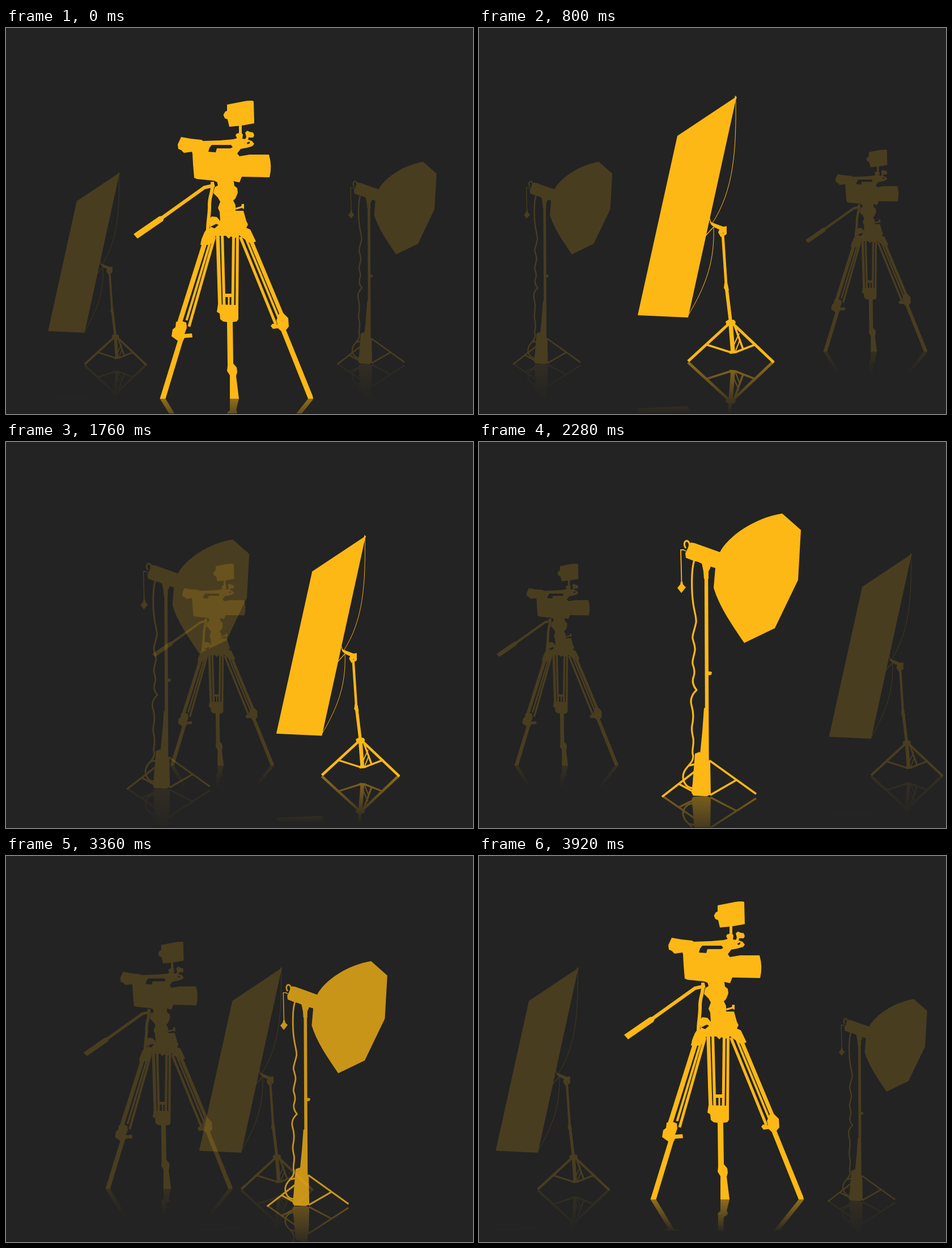
These frames come from a looping animation (824x680 px, 4.04 s). An HTML page with a canvas:

```html
<!DOCTYPE html>
<html lang="en">
<head>
<meta charset="utf-8">
<title>Studio gear</title>
<style>
html, body { margin: 0; width: 100%; height: 100%; overflow: hidden; background: #232323; }
canvas { display: block; }
</style>
</head>
<body>
<canvas id="stage" width="824" height="680"></canvas>
<script>
const W = 824, H = 680, LOOP = 4040, STEP = 40;
const YELLOW = '#fdb815', DIM = 0.173;

const ctx = document.getElementById('stage').getContext('2d');
const layer = document.createElement('canvas');
layer.width = W;
layer.height = H;
const ink = layer.getContext('2d');

// Slides between poses: [start, end]
const moves = [[0, 560], [1480, 1960], [3040, 3720]];

// pose: [x, y, scale] of the lower left corner; fade: [start, end, from, to]
const panel = {
  origin: [280, 589], floor: 588, squash: 1, mirror: [92, 92, 0.5, 0],
  poses: [[74.2, 594, 0.724], [280, 589, 1], [617.6, 588.7, 0.836], [29.5, 588.7, 0.836]],
  fades: [[320, 560, DIM, 1], [1800, 2040, 1, DIM]],
  fills: [
    'M452 119L455 122L453 127L369 510L280 506L350 190L451 123Z',
    'M407 341L420 346L431 350L437 349L437 363L433 366L431 360L427 369L422 360L424 355L417 352L410 347Z',
    'M433 449L438 449L441 462L436 464L432 458Z',
    'M435 517L440 514L450 514L453 518L451 524L437 524Z',
    'M440 570L446 567L456 569L454 573L443 574Z'
  ],
  lines: [
    [1, 'M453 125C454 215 450 285 411 345'],
    [1, 'M414 350C416 408 402 452 368 508'],
    [1.3, 'M398 368L416 348M406 333L410 345'],
    [4.8, 'M430 362L436 452'],
    [6, 'M436 452L444 518'],
    [5, 'M442 520L369 587M447 520L520 589'],
    [7.5, 'M444 520L448 571'],
    [3.6, 'M450 522L466 566M402 558L443 571M489 557L453 571'],
    [2, 'M448 562L459 538M453 568L461 548']
  ]
};

const octabox = {
  origin: [323, 626], floor: 624, squash: 0.9, mirror: [90, 90, 0.4, 0],
  poses: [[584.5, 593.2, 0.715], [60, 593.2, 0.715], [323, 626, 1], [615.5, 609.5, 0.715]],
  fades: [[2040, 2280, DIM, 1], [3280, 3560, 1, DIM]],
  fills: [
    'M425 194C440 166 485 134 535 126L568 155L563 243L522 328L468 354C445 320 424 290 414 257L417 222L397 216L386 211L378 209L365 204L364 196L368 188L373 177L380 178Z',
    'M393 213L409 217L408 222L405 228L405 241L397 241L396 228Z',
    'M350 257L355 251L356 246L359 246L360 251L365 256L357 266Z',
    'M402 406L406 404L411 405L410 410L406 411L402 409Z',
    'M397 469L402 466L404 566L389 560L394 510Z',
    'M381 549L389 546L393 549L394 560L408 564L409 621L402 624L378 623L375 618L377 600L379 575Z'
  ],
  lines: [
    [3, 'M365 187C360 180 363 174 367 174C371 175 373 182 370 187'],
    [1.8, 'M365 192L361 190L356 190L357.500 248'],
    [6.4, 'M401 236L402.500 566'],
    [3.2, 'M380 208C374 225 375 265 378 285C380 300 384 309 383 318C380 333 376 339 377 346C379 355 382 361 381 367C379 379 376 384 377 391C381 402 381 407 379 412C375 422 378 430 384 437C376 444 372 454 375 464C379 478 378 486 377 494C374 506 376 512 378 522C380 535 374 544 378 553C378 566 367 570 362 581C357 592 362 609 378 610'],
    [3.6, 'M380 581L323 625M352 602L380 617M370 570L408 562L489 620M455 595L408 622']
  ]
};

const camera = {
  origin: [225, 653], floor: 653, squash: 0.5, mirror: [55, 55.5, 0.5, 0.04],
  poses: [[225, 653, 1], [576, 570, 0.678], [31, 570, 0.678], [256, 605, 1]],
  fades: [[560, 800, 1, DIM], [3680, 3920, DIM, 1]],
  fills: [
    // monitor and its mount
    'M390 135L418 129.500Q434 127 437 129L438 168L415 172L394 174L391 161L386 159L383.500 153L387 147L390 146Z',
    'M411 171L416 171L416 185L418 188L417 195L408 195L405 189L407 186L411 185Z',
    'M422 184L426 181L430 183L436 184L438 189L436 193L428 193L427 198L421 198L424 192Z',
    // camcorder
    'M309 192L326 195L345 197L348 199L378 198L401 196L408 194L425 196L434 199L438 204L435 208L425 211L414 213L408 221L412 226L430 223L464 223Q470 243 465 263L416 262L412 272L402 270L397 274L376 273L367 269L337 266L332 264L330 240L329 221L328 218L314 220L309 215L304 213L303 205Z',
    // head
    'M372 270L402 271L403 278L408 282L409 290L405 300L401 304L405 312L405 322L419 322L424 340L427 346L424 352L431 355L441 376L432 380L418 370L411 365L403 371L397 367L393 371L388 366L370 366L364 378L358 382L343 382L345 372L350 360L354 354L360 353L358 337L363 332L372 333L378 340L377 324L374 317L378 306L374 299L366 291L368 281L374 277Z',
    'M404 317L415 314L416 310L420 310L420 319L416 317L406 320Z',
    // grip
    'M225 363L270 332L275 331L279 335L277 340L232 371Z',
    // left leg
    'M300 518L307 515L318 519L319 528L315 539L328 538L329 545L315 546L312 552L281.500 653L271.500 653L303 551L292 543L294 531L299 527Z',
    // right leg
    'M482 503L489 502L498 511L499 526L494 532L541 648L542 653L533 653L485.500 534L480 529L471 530L467 525L470 521L479 522L477 515Z',
    // middle leg
    'M374 487L410 488L410 513L407 517L400 518L401 591L407 598L408 606L406 613L411 653L395 653L395 612L390 604L391 595L390 518L383 517L378 513L377 503L372 500Z'
  ],
  holes: [
    'M357 218L359 211L363 206L397 206L400 210L396 212L372 212L370 219Z',
    'M361 350L371 345L375 347L368 353Z',
    'M425 202L430 200L430 203L426 205Z'
  ],
  lines: [
    [6, 'M368 277L350 281L273 336'],
    [6, 'M364 271C366 290 358 295 359 315C359 330 356 340 356 357'],
    [8.5, 'M351.500 376L306 520'],
    [4.2, 'M360.500 376L318.500 515'],
    [4.8, 'M368 368L323 526'],
    [5, 'M413.500 368L476 522'],
    [4, 'M423 370L481 511'],
    [7, 'M432 374L487 506'],
    [6.5, 'M373.500 362L377.500 490'],
    [5, 'M381.500 362L385 490'],
    [5, 'M401.500 364L400 490M408.500 364L407.500 490'],
    [6, 'M384 471L401 471'],
    [3, 'M393 472L393 490']
  ]
};

const gear = [panel, octabox, camera];
for (const g of gear) {
  g.fills = g.fills.map(d => new Path2D(d));
  g.holes = (g.holes || []).map(d => new Path2D(d));
  g.lines = g.lines.map(([w, d]) => [w, new Path2D(d)]);
}

const lerp = (a, b, p) => a + (b - a) * p;
const ramp = (t, a, b) => Math.min(1, Math.max(0, (t - a) / (b - a)));

function poseAt(g, t) {
  let i = 0;
  while (i < 2 && t >= moves[i + 1][0]) i++;
  const p = ramp(t, ...moves[i]);
  return g.poses[i].map((v, k) => lerp(v, g.poses[i + 1][k], p));
}

function alphaAt(g, t) {
  let alpha = g.fades[0][2];
  for (const [a, b, from, to] of g.fades) {
    if (t >= a) alpha = lerp(from, to, ramp(t, a, b));
  }
  return alpha;
}

function paint(g) {
  ink.fillStyle = ink.strokeStyle = YELLOW;
  ink.lineJoin = 'round';
  g.fills.forEach(f => ink.fill(f));
  ink.globalCompositeOperation = 'destination-out';
  g.holes.forEach(h => ink.fill(h));
  ink.globalCompositeOperation = 'source-over';
  for (const [w, line] of g.lines) {
    ink.lineWidth = w;
    ink.stroke(line);
  }
}

function maskMirror(g, floor, s) {
  const [len, cut, near, far] = g.mirror;
  const fade = ink.createLinearGradient(0, floor, 0, floor + cut * s);
  fade.addColorStop(0, `rgba(0,0,0,${near})`);
  fade.addColorStop(len / cut, `rgba(0,0,0,${far})`);
  fade.addColorStop(1, 'rgba(0,0,0,0)');
  ink.setTransform(1, 0, 0, 1, 0, 0);
  ink.globalCompositeOperation = 'destination-in';
  ink.fillStyle = fade;
  ink.fillRect(0, 0, W, H);
  ink.globalCompositeOperation = 'source-over';
}

function drawGear(g, t) {
  const [x, y, s] = poseAt(g, t);
  const [ox, oy] = g.origin;
  const left = x - ox * s, top = y - oy * s;
  const floor = top + g.floor * s;
  const flip = s * g.squash;

  ink.setTransform(1, 0, 0, 1, 0, 0);
  ink.clearRect(0, 0, W, H);
  ink.setTransform(s, 0, 0, -flip, left, floor + g.floor * flip);
  paint(g);
  maskMirror(g, floor, s);
  ink.setTransform(s, 0, 0, s, left, top);
  paint(g);

  ctx.globalAlpha = alphaAt(g, t);
  ctx.drawImage(layer, 0, 0);
  ctx.globalAlpha = 1;
}

const begin = performance.now();
function frame() {
  const now = (performance.now() - begin) % LOOP;
  const t = Math.floor(now / STEP) * STEP;
  ctx.fillStyle = '#232323';
  ctx.fillRect(0, 0, W, H);
  gear.forEach(g => drawGear(g, t));
  ctx.fillStyle = '#1f1d1e';
  ctx.fillRect(0, H - 1, W, 1);
  requestAnimationFrame(frame);
}
frame();
</script>
</body>
</html>
```
